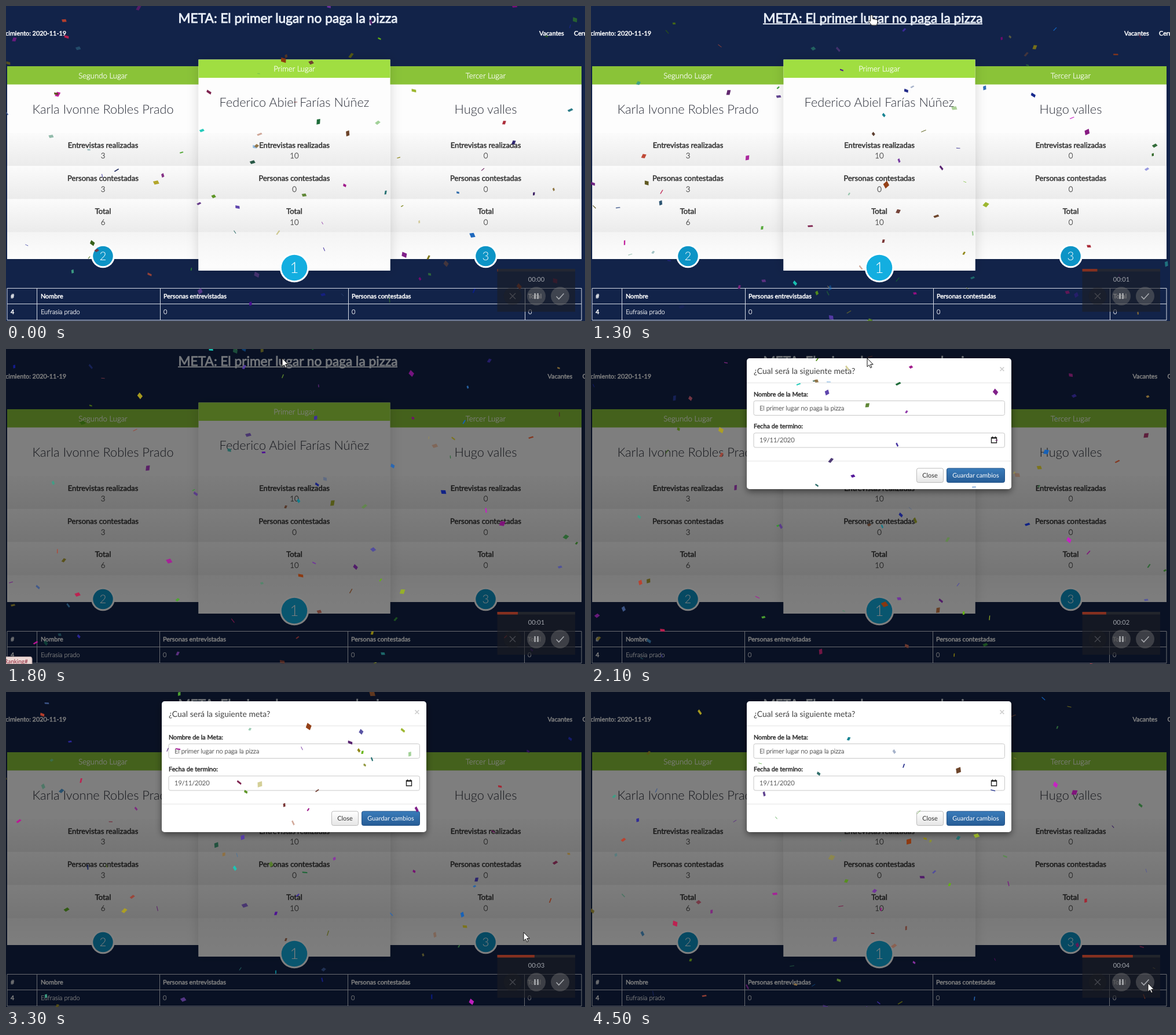
Animation of 1000x544 px, one loop 4.6 s. Source, as an HTML page:

```html
<!DOCTYPE html>
<html lang="es">
<head>
<meta charset="utf-8">
<title>Ranking</title>
<style>
html, body { margin: 0; width: 100%; height: 100%; overflow: hidden; background: #122349; }
svg { display: block; width: 1000px; height: 544px; font: 300 11px Lato, sans-serif; text-rendering: geometricPrecision; }
text { fill: currentColor; white-space: pre; }
.bold { font-weight: 400; stroke: currentColor; stroke-width: .5px; }
.firm { stroke: currentColor; stroke-width: .25px; }
.regular { font-weight: 400; }
.mid { text-anchor: middle; }
.end { text-anchor: end; }
</style>
</head>
<body>
<svg id="stage" viewBox="0 0 1000 544" xmlns="http://www.w3.org/2000/svg">
  <defs>
    <linearGradient id="row" x2="0" y2="1"><stop stop-color="#fbfbfb"/><stop offset="1" stop-color="#ebebeb"/></linearGradient>
    <linearGradient id="foot" x2="0" y2="1"><stop stop-color="#f4f4f4"/><stop offset="1" stop-color="#fdfdfd"/></linearGradient>
    <linearGradient id="plain" x2="0" y2="1"><stop stop-color="#fff"/><stop offset="1" stop-color="#e6e6e6"/></linearGradient>
    <linearGradient id="primary" x2="0" y2="1"><stop stop-color="#3a7cba"/><stop offset="1" stop-color="#265c96"/></linearGradient>
    <filter id="glow" x="-20%" y="-20%" width="140%" height="140%"><feDropShadow dx="0" dy="0" stdDeviation="10" flood-opacity=".15"/></filter>
    <filter id="drop" x="-10%" y="-15%" width="120%" height="135%"><feDropShadow dx="0" dy="4" stdDeviation="6" flood-opacity=".5"/></filter>
  </defs>
  <rect width="1000" height="544" fill="#122349"/>
  <g id="page"></g>
  <rect id="shade" width="1000" height="544"/>
  <g id="modal"></g>
  <g id="status">
    <path d="M0 531.5H42Q45 531.5 45 535V544H0Z" fill="#ecd9d6" stroke="#a99"/>
    <text x="-3" y="543" font-size="10" color="#8c2036" class="regular">Ranking#</text>
  </g>
  <g id="confetti"></g>
  <g id="recorder"></g>
  <path id="arrow" d="M0 0V14.6L3.4 11.5L5.7 16.6L7.9 15.6L5.7 10.6H10.2Z" fill="#fff" stroke="#111"/>
  <path id="hand" d="M-2 1.5Q0-1 2 1.5V7L9 8.5Q11 9 10.5 12L9 18H0L-5 11.5Q-5 9-2 11Z" fill="#fff" stroke="#111"/>
</svg>
<script>
const LOOP = 4600, STEP = 100;
const $ = id => document.getElementById(id);
const clamp = (v, lo = 0, hi = 1) => Math.min(hi, Math.max(lo, v));

const text = (x, y, body, {cls = '', size = 11, color = '#fff', extra = ''} = {}) =>
  `<text x="${x}" y="${y}" class="${cls}" font-size="${size}" color="${color}" ${extra}>${body}</text>`;
const rect = (x, y, w, h, fill, extra = '') =>
  `<rect x="${x}" y="${y}" width="${w}" height="${h}" fill="${fill}" ${extra}/>`;
const circle = (x, y, r, fill, extra = '') =>
  `<circle cx="${x}" cy="${y}" r="${r}" fill="${fill}" ${extra}/>`;

function card({x, top, bottom, green, blue, place, name, rank, radius, values, shadow = ''}) {
  const mid = x + 165.5, labels = ['Entrevistas realizadas', 'Personas contestadas', 'Total'];
  const rows = labels.map((label, i) => {
    const y = 219 + i * 57.2;
    return rect(x, y, 331, 57.4, 'url(#row)') +
      text(mid, y + 26, label, {cls: 'bold mid', size: 13, color: '#333'}) +
      text(mid, y + 44.3, values[i], {cls: 'firm mid', size: 13.2, color: '#333'});
  }).join('');
  return rect(x, top, 331, bottom - top, '#fdfdfd', shadow) + rect(x, top, 331, 31.5, green) +
    text(mid, top + 20.7, place, {cls: 'firm mid', size: 13.2}) +
    text(mid, top + 81.7, name, {cls: 'mid', size: 21.7, color: '#2c2f3a'}) + rows +
    rect(x, 390.6, 331, bottom - 390.6, 'url(#foot)') +
    circle(mid, bottom - 5, radius + 3, '#fff') + circle(mid, bottom - 5, radius, blue) +
    text(mid, bottom - 5 + radius * .42, rank, {cls: 'mid', size: radius * 1.18});
}

function buildPage() {
  const side = {top: 104, bottom: 437, green: '#8ac338', blue: '#0d94c6', radius: 17.3};
  const cards = [
    {...side, x: 2, place: 'Segundo Lugar', name: 'Karla Ivonne Robles Prado', rank: 2, values: [3, 3, 6]},
    {...side, x: 663, place: 'Tercer Lugar', name: 'Hugo valles', rank: 3, values: [0, 0, 0]},
    {x: 332.5, top: 92.5, bottom: 457, green: '#a0de41', blue: '#13aee0', radius: 22.3, shadow: 'filter="url(#glow)"',
     place: 'Primer Lugar', name: 'Federico Abiel Farías Núñez', rank: 1, values: [10, 0, 10]}
  ].map(card).join('');
  const bold = {cls: 'bold', size: 10.85}, firm = {cls: 'firm'};
  const heads = ['Personas entrevistadas', 'Personas contestadas', 'Total'];
  const columns = [266, 591, 896].map((x, i) =>
    `<path d="M${x + .5} 488V542" stroke="#d5dae4"/>` +
    text(x + 6, 505, heads[i], bold) + text(x + 6, 532, 0, firm)).join('');
  $('page').innerHTML =
    text(487, 28.5, 'META: El primer lugar no paga la pizza',
      {cls: 'bold mid', size: 22.7, color: '#e9eff8', extra: 'style="stroke-width:.85px"'}) +
    rect(297, 30, 379, 1.8, '#e9eff8', 'id="underline"') +
    text(104, 51, 'Fecha de vencimiento: 2020-11-19', {cls: 'bold end', size: 10.85}) +
    `<g id="menu">${text(921, 51, 'Vacantes', bold)}${text(981, 51, 'Cerrar sesión', bold)}</g>` + cards +
    '<path d="M2 487.5H994V542.5H2ZM2 514.5H994M53.5 488V542" fill="none" stroke="#d5dae4"/>' +
    text(8, 505, '#', bold) + text(60, 505, 'Nombre', bold) +
    text(8, 532, 4, bold) + text(60, 532, 'Eufrasia prado', firm) + `<g id="columns">${columns}</g>`;
}

function buildModal() {
  const field = (y, label, value) =>
    text(281, y - 8, label, {cls: 'bold', size: 10.8, color: '#333'}) +
    rect(281, y, 433.5, 25, '#fff', 'rx="3" stroke="#c8c8c8"') +
    text(291, y + 16, value, {cls: 'firm', color: '#444'});
  const button = (x, w, label, fill, stroke, color) =>
    rect(x, 206, w, 24.5, `url(#${fill})`, `rx="3" stroke="${stroke}"`) +
    text(x + w / 2, 222, label, {cls: 'regular mid', size: 10.9, color});
  $('modal').innerHTML =
    rect(269, 16, 457, 226, '#fff', 'rx="5" filter="url(#drop)"') +
    '<path d="M269 58.5H726M269 193.5H726" stroke="#e5e5e5"/>' +
    text(281, 43, '¿Cual será la siguiente meta?', {cls: 'regular', size: 14, color: '#444'}) +
    text(710, 40, '×', {cls: 'bold mid', size: 16, color: '#ccc'}) +
    field(89.5, 'Nombre de la Meta:', 'El primer lugar no paga la pizza') +
    field(145, 'Fecha de termino:', '19/11/2020') +
    '<path d="M691.5 153H700.5V162H691.5ZM691 154H701M693.5 151V153M698.5 151V153" fill="none" stroke="#222" stroke-width="1.4"/>' +
    button(562.5, 46, 'Close', 'plain', '#bbb', '#333') +
    button(614.5, 100, 'Guardar cambios', 'primary', '#245489', '#fff');
}

function buildRecorder() {
  $('recorder').innerHTML =
    rect(848.5, 454, 134.5, 74, '#1c1d24', 'opacity=".6"') +
    rect(848.5, 454, 134.5, 4.5, '#2c2d33', 'opacity=".6"') +
    rect(848.5, 454, 1, 4.5, '#86301f', 'id="progress"') +
    text(916, 476, '', {cls: 'regular mid', color: '#a3a6ad', extra: 'id="clock"'}) +
    circle(875, 501, 15.5, '#222', 'opacity=".3"') +
    circle(916, 501, 16, '#777', 'opacity=".42"') + circle(957, 501, 16, '#777', 'opacity=".42"') +
    '<path d="M870 496L880 506M880 496L870 506" stroke="#45474e" stroke-width="1.4"/>' +
    '<path d="M913.5 496V506M918.5 496V506" stroke="#b4b6ba" stroke-width="2.2"/>' +
    '<path d="M950.5 501.5L954.8 506L963.5 496.5" fill="none" stroke="#a8abb0" stroke-width="1.6"/>';
}

let seed = 20;
const random = (lo = 0, hi = 1) => {
  seed = (seed * 16807) % 2147483647;
  return lo + (hi - lo) * seed / 2147483647;
};

function buildConfetti() {
  return Array.from({length: 86}, () => {
    const size = random(4.5, 9), h = size * random(.65, 1);
    const node = document.createElementNS('http://www.w3.org/2000/svg', 'rect');
    const attrs = {x: -size / 2, y: -h / 2, width: size, height: h,
      fill: `hsl(${random(0, 360)} ${random(35, 85)}% ${random(20, 46)}%)`,
      opacity: random() < .2 ? .45 : .95};
    for (const key in attrs) node.setAttribute(key, attrs[key]);
    $('confetti').append(node);
    return {node, x: random(0, 1000), y: random(0, 580), fall: random(100, 210), drift: random(-22, 22),
      sway: random(3, 10), phase: random(0, 6.28), flip: random(3, 8), angle: random(0, 360), spin: random(-150, 150)};
  });
}

function moveConfetti(p, s) {
  const x = p.x + p.drift * s + p.sway * Math.sin(p.phase + 2 * s);
  const y = (p.y + p.fall * s) % 580 - 18;
  const flip = Math.cos(p.phase + p.flip * s);
  const squash = Math.sign(flip || 1) * Math.max(.18, Math.abs(flip));
  p.node.setAttribute('transform',
    `translate(${x} ${y}) rotate(${p.angle + p.spin * s}) skewX(14) scale(1 ${squash})`);
}

// time, x, y of the pointer
const pointerPath = [[300, 592, 262], [500, 561, 226], [1200, 486, 15], [1600, 477, 16],
  [2400, 477, 16], [3200, 894, 415], [3500, 894, 415], [4300, 962, 503]];

function pointerAt(t) {
  const i = pointerPath.findIndex(k => k[0] > t);
  if (i < 1) return pointerPath.at(i).slice(1);
  const [a, b] = [pointerPath[i - 1], pointerPath[i]];
  const u = (t - a[0]) / (b[0] - a[0]), e = u * u * (3 - 2 * u);
  return [a[1] + (b[1] - a[1]) * e, a[2] + (b[2] - a[2]) * e];
}

const show = (id, on) => $(id).setAttribute('visibility', on ? 'visible' : 'hidden');

function render(t) {
  const opened = t >= 1700;
  show('underline', t >= 1200 && t < 1900);
  show('status', t >= 1500 && t < 2000);
  $('menu').setAttribute('transform', `translate(${opened ? 14.5 : 0} 0)`);
  $('columns').setAttribute('transform', `translate(${opened ? -1 : 0} 0)`);
  $('shade').setAttribute('opacity', .5 * clamp((t - 1645) / 150));

  const slide = (1 - clamp((t - 1800) / 300)) ** 2;
  $('modal').setAttribute('opacity', clamp((t - 1800) / 150));
  $('modal').setAttribute('transform', `translate(0 ${-58 * slide})`);

  confetti.forEach(p => moveConfetti(p, t / 1000));
  $('progress').setAttribute('width', 1 + t * .0192);
  $('clock').textContent = '00:0' + Math.floor(t / 1000);

  const [x, y] = pointerAt(t), hovering = t >= 1200 && t < 1600;
  for (const id of ['arrow', 'hand']) $(id).setAttribute('transform', `translate(${x} ${y})`);
  show('arrow', t >= 300 && !hovering);
  show('hand', hovering);
}

buildPage();
buildModal();
buildRecorder();
const confetti = buildConfetti();
const start = performance.now();
function tick() {
  const t = (performance.now() - start) % LOOP;
  render(Math.floor(t / STEP) * STEP);
  requestAnimationFrame(tick);
}
tick();
</script>
</body>
</html>
```
